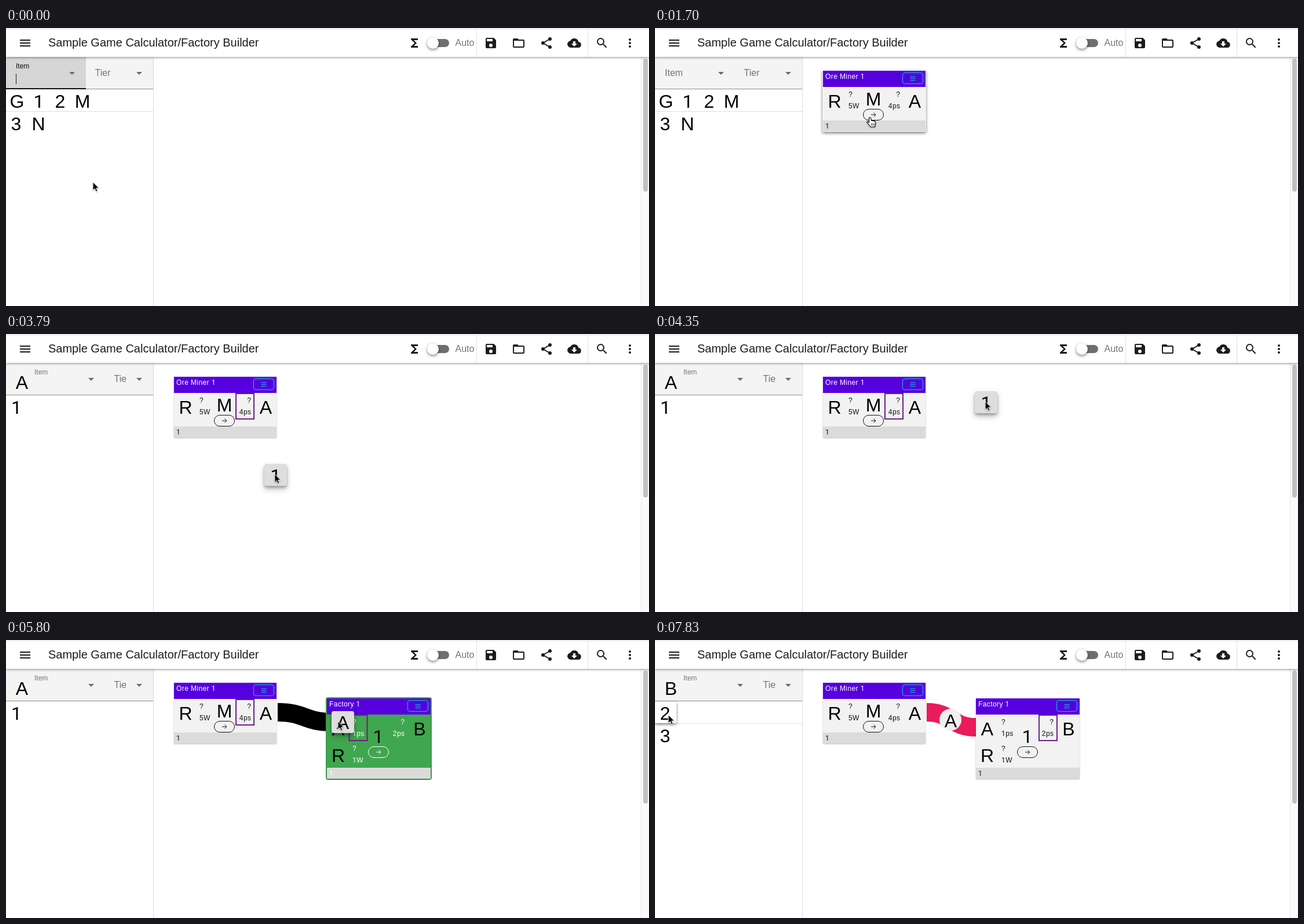
Animation, 1110 px wide and 481 px high, one loop 8000 ms. Source, as an HTML page:

```html
<!DOCTYPE html>
<html lang="en">
<head>
<meta charset="utf-8">
<title>Factory Builder</title>
<style>
  html, body { margin: 0; width: 100%; height: 100%; overflow: hidden; background: #fff; }
  svg { display: block; }
  text { font: 12px "Liberation Sans", Arial, sans-serif; white-space: pre; fill: #111; }
  .one { font-family: Roboto, Inter, sans-serif; }
  .title { font-size: 20px; fill: #1c1c1c; }
  .field { font-size: 16px; fill: #757575; }
  .big { font-size: 32px; text-anchor: middle; fill: #000; }
  .small { letter-spacing: .4px; }
  .end { text-anchor: end; }
  .white, .green .small { fill: #fff; }
  .pill { fill: none; stroke: #111; }
  .green .pill { stroke: #fff; }
  .pick { fill: none; stroke: #6b1d83; stroke-width: 2; }
  .flat { filter: drop-shadow(0 1px 1px rgba(0,0,0,.28)); }
  .raised { filter: drop-shadow(0 2px 2.5px rgba(0,0,0,.5)); }
  .lifted { filter: drop-shadow(0 3px 2px rgba(0,0,0,.22)) drop-shadow(0 5px 5px rgba(0,0,0,.25)); }
  .pointer { filter: drop-shadow(0 1px 1px rgba(0,0,0,.3)); }
</style>
</head>
<body>
<svg id="stage" width="1110" height="481" viewBox="0 0 1110 481"></svg>
<script>
const LOOP = 8000;
const stage = document.getElementById('stage');

const rect = (x, y, w, h, fill, extra = '') =>
  `<rect x="${x}" y="${y}" width="${w}" height="${h}" fill="${fill}" ${extra}/>`;
const text = (x, y, str, cls = 'small') =>
  `<text x="${x}" y="${y}" class="${cls}">${str.replace(/1/g, '<tspan class="one">1</tspan>')}</text>`;
const big = (x, y, str) => text(x, y, str, 'big');
const path = (d, extra = '') => `<path d="${d}" ${extra}/>`;
const at = (x, y, body) => `<g transform="translate(${x} ${y})">${body}</g>`;
// Shown only inside the given time spans: "start end, start end"
const during = (spans, body, extra = '') => `<g data-on="${spans}" ${extra}>${body}</g>`;
const caret = x => path(`M${x - 5} 76h10l-5 5z`, 'fill="#6b6b6b"');

function header() {
  const icon = (cx, body) => at(cx - 12, 14, `<g fill="#1c1c1c">${body}</g>`);
  const dot = (x, y, r) => `<circle cx="${x}" cy="${y}" r="${r}"/>`;
  const line = 'fill="none" stroke="#1c1c1c" stroke-width="2"';
  return rect(0, 0, 1110, 50, '#fff', 'style="filter:drop-shadow(0 1px 2px rgba(0,0,0,.45))"') +
    rect(0, 1, 1110, 1, '#dcdcdc') +
    icon(33, path('M3 18h18v-2H3zm0-5h18v-2H3zm0-7v2h18V6z')) +
    text(73, 32, 'Sample Game Calculator/Factory Builder', 'title') +
    icon(705, path('M18 4H6v2l6.5 6L6 18v2h12v-3h-7l5-5-5-5h7z')) +
    rect(728, 19, 37, 14, '#6f6f6f', 'rx="7"') +
    '<circle cx="737" cy="26" r="10" fill="#fff" class="raised"/>' +
    text(775.5, 31, 'Auto', 'field') +
    rect(812, 2, 1, 48, '#e2e2e2') + rect(1004, 2, 1, 48, '#e2e2e2') +
    icon(837, path('M17 3H5a2 2 0 0 0-2 2v14a2 2 0 0 0 2 2h14a2 2 0 0 0 2-2V7zM12 19a3 3 0 1 1 0-6 3 3 0 0 1 0 6zM15 9H5V5h10z')) +
    icon(885, path('M3 18V6a1 1 0 0 1 1-1h5.600l2 2H20a1 1 0 0 1 1 1v10a1 1 0 0 1-1 1H4a1 1 0 0 1-1-1zM3 7h9', line)) +
    icon(933, dot(18, 5, 3) + dot(6, 12, 3) + dot(18, 19, 3) + path('M18 5L6 12l12 7', line)) +
    icon(981, path('M19.35 10.04A7.500 7.500 0 0 0 5.350 8.040 6 6 0 0 0 6 20h13a5 5 0 0 0 .35-9.960zM17 13l-5 5-5-5h3V9h4v4z')) +
    icon(1029, `<circle cx="9.5" cy="9.5" r="5.500" ${line}/>` + path('M14 14l5.700 5.700', line)) +
    icon(1077, dot(12, 6, 2) + dot(12, 12, 2) + dot(12, 18, 2));
}

function sidebar() {
  const divider = rect(0, 144, 254, 1, '#dedede');
  const hover = (x, y = 107) => rect(x, y, 37, 37, '#fff', 'rx="2" class="raised"');
  const chosen = item =>
    big(27.500, 95, item) + text(49, 70, 'Item', 'field" style="font-size:12px') +
    caret(147) + text(186.500, 83, 'Tie', 'field');
  return rect(0, 50, 254, 55, '#f4f4f4') + rect(0, 105, 254, 1, '#8e8e8e') +
    rect(254, 50, 1, 431, '#dcdcdc') + caret(230) +
    during('0 400',
      rect(0, 50, 138, 55, '#d6d6d6') + rect(0, 104, 138, 2, '#111') +
      text(17, 70, 'Item', '') + rect(17, 79, 1, 18, '#111')) +
    during('400 2350', text(17, 83, 'Item', 'field')) +
    during('0 2350',
      caret(114) + text(153.500, 83, 'Tier', 'field') + divider +
      during('320 480', hover(113)) +
      big(19, 138, 'G') + big(56.500, 138, '1') + big(93.500, 138, '2') + big(132, 138, 'M') +
      big(17.500, 177, '3') + big(56, 177, 'N')) +
    during('2350 6780', chosen('A') + during('3070 3230', hover(0)) + big(18, 138, '1')) +
    during('6780 8000',
      chosen('B') + divider + during('7670 8000', hover(0)) +
      big(17.500, 138, '2') + big(17.500, 177, '3'));
}

function cardFrame(x, y, w, h, name, raised) {
  const right = x + w;
  return rect(x, y, w, h, '#f2f2f2', 'class="flat"') +
    during(raised, rect(x - 1, y - 1, w + 2, h + 2, '#f2f2f2', 'rx="2" class="raised"')) +
    at(0, 0, `<g data-body="${name}"></g>`) +
    rect(x, y, w, 28, '#5600df') +
    text(x + 4, y + 14, name, 'small white') +
    rect(right - 39.500, y + 3.500, 35, 19, 'none', 'rx="3.500" stroke="#08c9d8"') +
    path([10.500, 13.500, 16.500].map(d => `M${right - 26.500} ${y + d}h9`).join(''), 'stroke="#08c9d8"');
}
const foot = (x, y, w) => rect(x, y, w, 19, '#dbdbdb') + text(x + 4, y + 14, '1');
const rate = (x, y, amount, cls = '') =>
  text(x, y, '?', 'small ' + cls) + text(x, y + 20, amount, 'small ' + cls);
const pill = (cx, cy) =>
  rect(cx - 17.500, cy - 9.500, 35, 19, 'none', 'rx="9.500" class="pill"') +
  path(`M${cx - 4} ${cy}h8m-3.500-3.500l3.500 3.500-3.500 3.500`, 'class="pill"');
const pick = (x, y) => rect(x + 1, y + 1, 31, 44, 'none', 'class="pick"');

function miner() {
  return during('1460 8000',
    cardFrame(290, 74, 177, 105, 'Ore Miner 1', '1460 2430,4840 5480') + foot(290, 160, 177) +
    big(310, 138, 'R') + rate(334, 119, '5W') + big(377, 134, 'M') + pill(377, 150) +
    rate(423.400, 119, '4ps', 'end') + big(448.500, 138, 'A') +
    during('2100 6780', pick(396, 102)));
}

function factory() {
  const green = rect(552, 99, 183, 143, '#40a64f', 'rx="4"');
  const parts = foot(554, 221, 179) +
    big(573.500, 165, 'A') + rate(598, 146, '1ps') + big(573.500, 211, 'R') + rate(598, 192, '1W') +
    big(642.500, 178, '1') + pill(643, 194) + rate(688.400, 146, '2ps', 'end') + big(714, 165, 'B');
  return during('4600 8000',
    during('5640 6050', green) +
    during('4600 5640,6050 8000', cardFrame(554, 101, 179, 139, 'Factory 1', '4600 4840,6050 7110') + parts) +
    during('5640 6050',
      cardFrame(554, 101, 179, 139, 'Factory 1', '0 0') +
      rect(554, 129, 179, 92, '#40a64f') + parts, 'class="green"') +
    during('4600 6780', pick(591.500, 129)) + during('6610 8000', pick(662, 129)));
}

// Horizontal-ended ribbon from the miner's output
const ribbon = (x, y) => {
  const mid = (469 + x) / 2;
  return `M469 125C${mid} 125 ${mid} ${y} ${x} ${y}`;
};

function links() {
  const base = 'fill="none" stroke-width="32"';
  return during('5160 6050', path('', `id="wire" ${base} stroke="#000"`)) +
    during('6050 8000', path(ribbon(554, 151), `${base} stroke="#e91b5b"`) +
      '<circle cx="510" cy="138" r="19" fill="#f0f0f0"/>' + big(510.500, 151, 'A'));
}

function scrollbar() {
  return rect(1096, 50, 14, 431, '#fafafa') + rect(1096, 50, 1, 431, '#e6e6e6') +
    rect(1100, 53, 8, 230, '#c1c1c1', 'rx="4"');
}

// Dragged tiles: label, time span, pointer offset inside the tile
const drags = [
  { label: 'M', from: 480, to: 1460, dx: 19, dy: 20 },
  { label: '1', from: 3230, to: 4600, dx: 18, dy: 18 },
  { label: 'A', from: 5160, to: 6050, dx: 11, dy: 18 }
];
const tiles = () => drags.map(d =>
  during(`${d.from} ${d.to}`, `<g class="tile">${rect(0, 0, 39, 38, '#dedede', 'rx="4" class="lifted"')}${big(19.500, 31, d.label)}</g>`)
).join('');

function pointer() {
  const look = 'fill="#000" stroke="#fff" stroke-width="1" stroke-linejoin="round" class="pointer"';
  const hand = 'fill="#fff" stroke="#000" stroke-width="1.100" stroke-linejoin="round" class="pointer"';
  return '<g id="pointer">' +
    during('0 1620,2430 6370,6950 8000', path('M0 -.5v14.500l3.300-3.100 2.300 5.300 2.500-1.100-2.300-5.100h4.600z', look)) +
    during('1620 2430,6370 6950',
      path('M-1.500 .5q1.500-1.500 3 .3l1.200 4.700q1.400-1 2.500.2 1.400-.8 2.400.5 1.500-.4 1.900 1.200l.3 3.600-1.300 5h-7.500l-3.500-4.500-2.800-3.700q.4-1.800 2.700-.3l1.300 1.200z', hand) +
      path('M2.500 10v3.500m2.300-3.500v3.500m2.300-3.500v3.500', 'stroke="#000" fill="none" stroke-width=".9"')) +
    '</g>';
}

stage.innerHTML = links() + miner() + factory() + sidebar() + scrollbar() + header() + tiles() + pointer();

const timed = [...stage.querySelectorAll('[data-on]')].map(el => ({
  el, spans: el.dataset.on.split(',').map(s => s.trim().split(' ').map(Number))
}));
const tileEls = [...stage.querySelectorAll('.tile')];
const wire = document.getElementById('wire');
const pointerEl = document.getElementById('pointer');

// Pointer moves: start, end, bend x, bend y, target x, target y
const home = [150, 267];
const moves = [
  [0, 400, 172, 200, 132, 128],
  [400, 1120, 220, 158, 307, 92],
  [1460, 1700, 335, 135, 371, 155],
  [1700, 2020, 395, 150, 412, 131],
  [2350, 2990, 220, 420, 33, 146],
  [2990, 3150, 24, 138, 18, 126],
  [3230, 4030, 300, 360, 588, 187],
  [4030, 4350, 590, 125, 570, 117],
  [4600, 5080, 505, 140, 441, 126],
  [5160, 5800, 510, 145, 573, 141],
  [6050, 6450, 620, 165, 672, 163],
  [6930, 6950, 667, 180, 662, 202],
  [6950, 7750, 330, 442, 24, 133],
  [7750, 7830, 23, 131, 23, 130]
];

// The picture refreshes every 80 ms inside these bursts and rests between them
const bursts = [[0, 1120], [1460, 2100], [2350, 4350], [4600, 5800], [6050, 6610], [6780, 6780], [6950, 7830]];
function heldTime(t) {
  const [from, to] = bursts.filter(b => b[0] <= t).pop();
  return Math.min(to, from + Math.floor((t - from) / 80) * 80);
}

function pointerAt(t) {
  let [x, y] = home;
  for (const [from, to, bx, by, tx, ty] of moves) {
    if (t < from) break;
    const p = Math.min(1, (t - from) / (to - from));
    const u = p * p * (3 - 2 * p), v = 1 - u;
    x = v * v * x + 2 * u * v * bx + u * u * tx;
    y = v * v * y + 2 * u * v * by + u * u * ty;
  }
  return [x, y];
}

function draw(t) {
  for (const { el, spans } of timed) {
    el.style.display = spans.some(([a, b]) => t >= a && t < b) ? '' : 'none';
  }
  const [x, y] = pointerAt(t);
  pointerEl.setAttribute('transform', `translate(${x} ${y})`);
  drags.forEach((d, i) => tileEls[i].setAttribute('transform', `translate(${x - d.dx} ${y - d.dy})`));
  const last = drags[2];
  wire.setAttribute('d', ribbon(x - last.dx, y - last.dy + 19));
}

const start = performance.now();
function tick() {
  draw(heldTime((performance.now() - start) % LOOP));
  requestAnimationFrame(tick);
}
tick();
</script>
</body>
</html>
```
